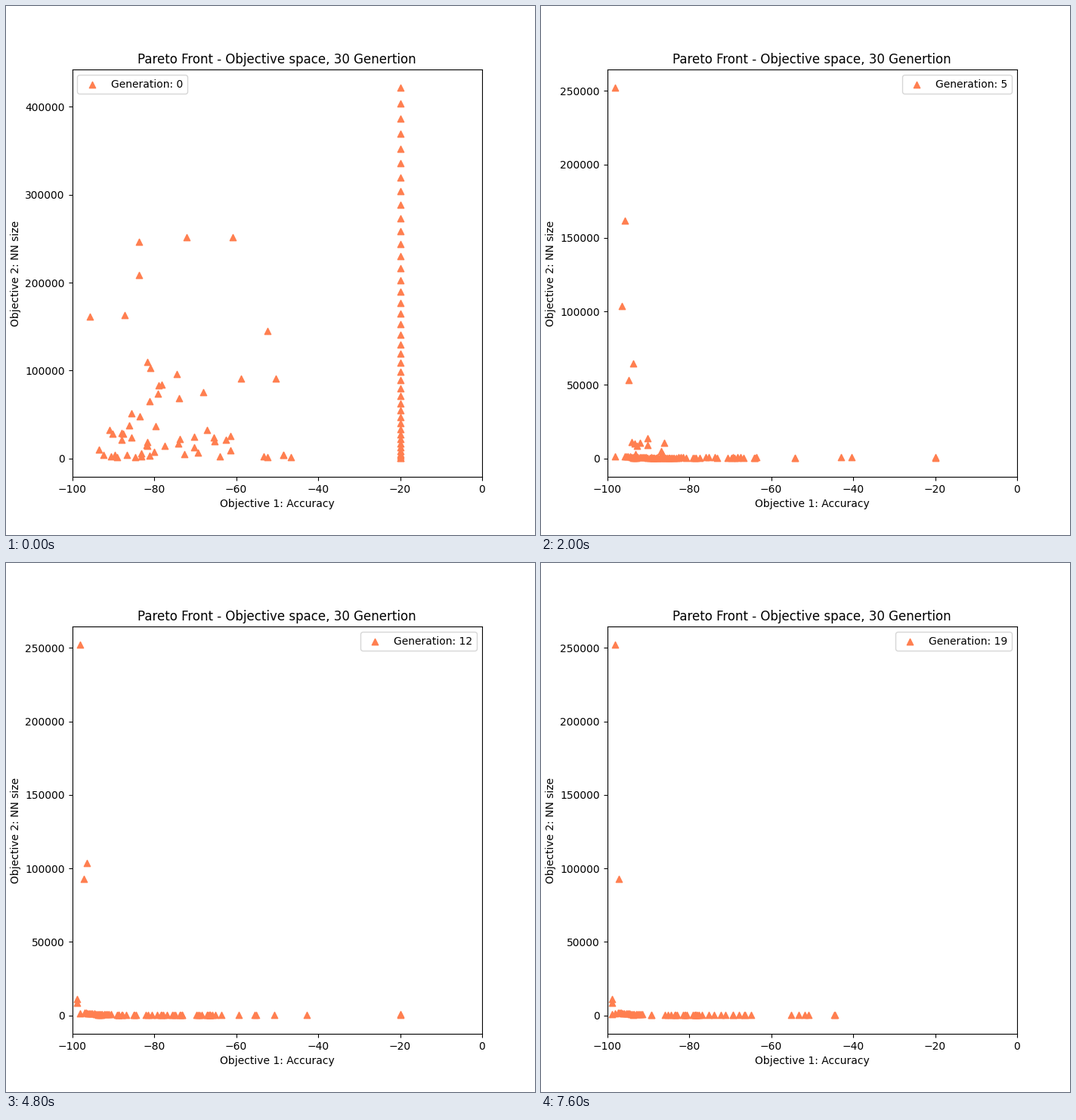
Write a matplotlib script that moves like this. It is 700 px wide and 700 px high and loops after 8000 ms.

```python
import matplotlib.pyplot as plt
import numpy as np
from matplotlib.animation import FuncAnimation

GENERATIONS = 20
INTERVAL = 400
GUESSING = -19.9  # accuracy of networks that learned nothing
rng = np.random.default_rng(8)

# Outliers of the first population: (accuracy, size in thousands)
OUTLIERS = [(-60.8, 251.2), (-72.1, 251.2), (-83.7, 246.2), (-83.7, 208.3),
            (-87.2, 163), (-95.7, 161.3), (-52.3, 144.8), (-58.8, 90.5),
            (-50.3, 90.5)]

# Large networks: (accuracy, size in thousands, first and last generation)
ELITES = [(-98.1, 252, 1, 19), (-95.7, 161.7, 1, 10), (-96.4, 103.6, 4, 14),
          (-91.2, 95.2, 2, 3), (-97.2, 92.7, 7, 19), (-92, 65, 3, 3),
          (-93.6, 64.3, 2, 7), (-94.8, 53, 4, 7), (-88.8, 45.5, 2, 3),
          (-94, 11, 3, 6), (-98.8, 11, 12, 19), (-98.8, 8.5, 9, 19),
          (-98.1, 1.2, 2, 19), (-98.8, .8, 16, 19)]


def first_population():
    column_size = .2 + 421.2 * np.linspace(0, 1, 41) ** 1.7
    column = np.column_stack([np.full(41, GUESSING), column_size])
    acc = np.concatenate([rng.uniform(-94, -61, 47), rng.uniform(-61, -33, 5)])
    limit = 130 * np.exp(-((acc + 77) / 12) ** 2)
    cloud = np.column_stack([acc, .5 + 4 * rng.random(52)
                             + limit * rng.random(52) ** 2.2])
    return np.vstack([OUTLIERS, cloud, column])


FIRST = first_population()

# Medium networks that vanish as the front tightens
MEDIUM = np.column_stack([rng.uniform(-94.5, -86, 30), 40 * rng.random(30) ** 2])

# Small networks, each living for some generations
POOL_ACC = np.concatenate([rng.uniform(-91, -62, 120), rng.uniform(-62, -38, 20)])
POOL_BIRTH = rng.uniform(-8, GENERATIONS, POOL_ACC.size)
POOL_DEATH = POOL_BIRTH + rng.uniform(4, 12, POOL_ACC.size)
POOL_JITTER = rng.random(POOL_ACC.size)


def front(gen):
    """The packed end of the front, followed by loose small networks."""
    left = -92.5 - 5 * (1 - np.exp(-gen / 5))
    right = -91 + 8 / (1 + np.exp(gen - 7.5))
    packed = np.arange(left, right, .4)
    alive = (POOL_BIRTH <= gen) & (gen < POOL_DEATH)
    acc = np.concatenate([packed, POOL_ACC[alive]])
    jitter = np.concatenate([np.zeros(packed.size), POOL_JITTER[alive]])
    size = .25 + 1.5 * np.exp(-(acc + 97) / 4)
    size += 1.5 * jitter * np.exp((3 - gen) / 1.5)
    return np.column_stack([acc, size])


def population(gen):
    if gen == 0:
        return FIRST
    elites = [(acc, size) for acc, size, start, end in ELITES
              if start <= gen <= end]
    parts = [elites, front(gen), MEDIUM[MEDIUM[:, 1] < 40 * np.exp((3 - gen) / 2)]]
    if gen < 18:
        parts.append([(GUESSING, .7), (GUESSING, .05)])
    if gen < 3:
        # Dominated members of the first population die out quickly
        limit = 170 * np.exp(-(FIRST[:, 0] + 96) * gen / 12)
        parts.append(FIRST[FIRST[:, 1] < limit])
    return np.vstack(parts)


fig, ax = plt.subplots(figsize=(7, 7), dpi=100)
ax.set_title("Pareto Front - Objective space, 30 Genertion")
ax.set_xlabel("Objective 1: Accuracy")
ax.set_ylabel("Objective 2: NN size")
ax.set_xlim(-100, 0)
dots = ax.scatter([], [], marker="^", color="coral")


def draw(gen):
    points = population(gen) * (1, 1000)
    dots.set_offsets(points)
    dots.set_label(f"Generation: {gen}")
    low, high = points[:, 1].min(), points[:, 1].max()
    span = high - low
    ax.set_ylim(low - .05 * span, high + .0499 * span)
    ax.legend(loc="upper right" if gen else "upper left")
    return [dots]


animation = FuncAnimation(fig, draw, frames=GENERATIONS, interval=INTERVAL,
                          init_func=lambda: draw(0), repeat=True, repeat_delay=0)
plt.show()
```
